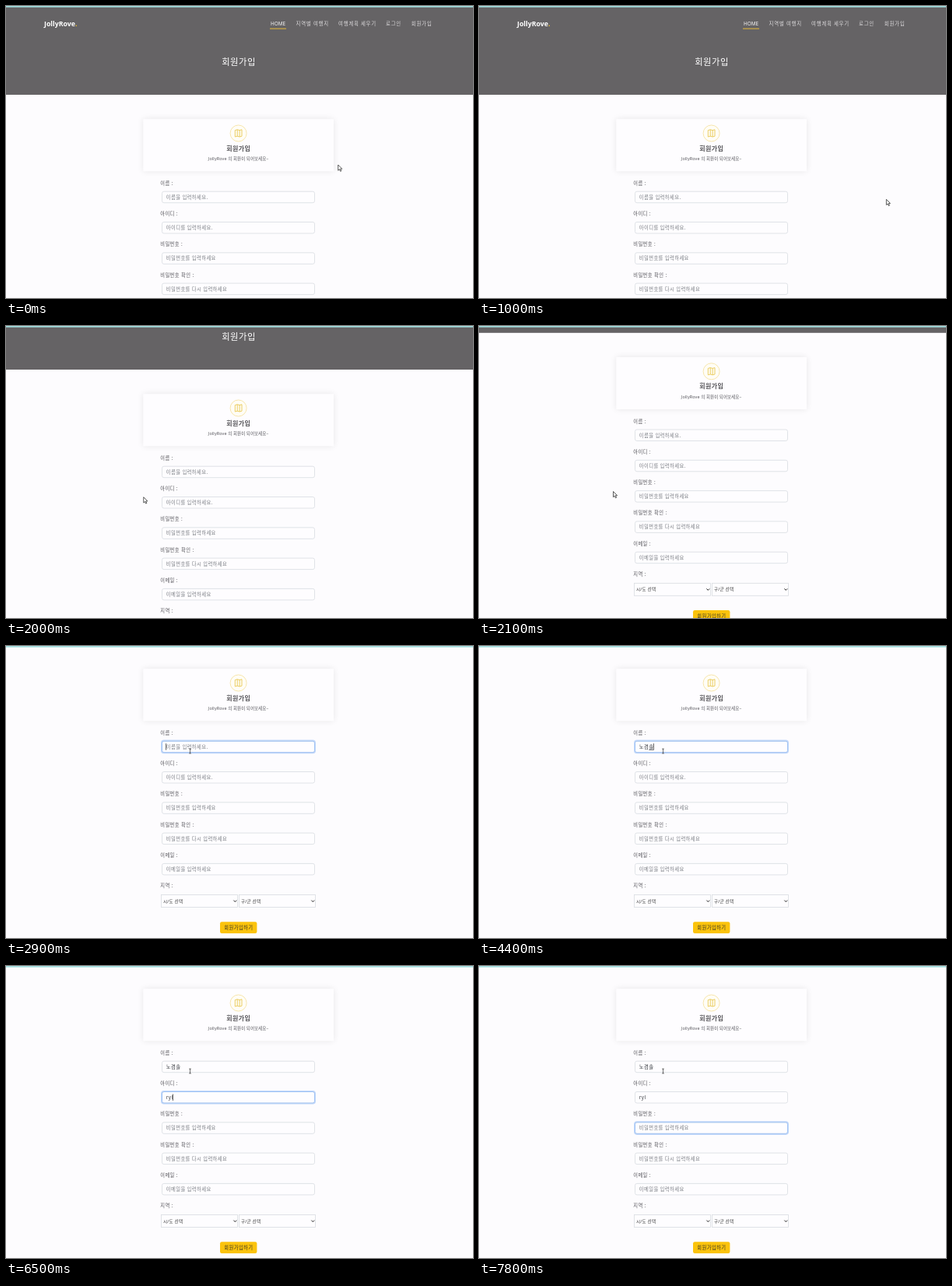
Write an HTML page that moves like this. It is 600x375 px and loops after 8 s.

```html
<!DOCTYPE html>
<html lang="ko">
<head>
<meta charset="utf-8">
<title>회원가입</title>
<style>
  html, body { margin: 0; width: 100%; height: 100%; overflow: hidden; background: #fdfcfe; }
  svg { display: block; width: 100vw; height: 100vh; }
  text { font-family: "Noto Sans", "Noto Sans CJK KR", "Noto Sans CJK", sans-serif; white-space: pre; }
  .nav { font-size: 6.4px; letter-spacing: .75px; fill: #dedcde; }
  .home { font: 500 6.4px "Open Sans", "Noto Sans", sans-serif; fill: #fff; }
  .brand { font: 700 8.8px "Noto Sans", sans-serif; fill: #fff; }
  .mid { text-anchor: middle; }
  .title { font-size: 11.3px; letter-spacing: .5px; fill: #fff; }
  .head { font-size: 8px; font-weight: 600; letter-spacing: .4px; fill: #565559; }
  .sub { font-size: 5.4px; letter-spacing: .15px; fill: #55545a; }
  .form { font-size: 6.3px; letter-spacing: .4px; }
  .label { fill: #55545a; }
  .hint { fill: #7b7e84; }
  .typed { fill: #3a3d42; }
  .go { fill: #3a3626; }
  .pick { font-size: 5.5px; letter-spacing: .25px; fill: #333; }
  .box { fill: #fefdff; stroke: #d9dce1; stroke-width: .8; }
</style>
</head>
<body>
<svg id="stage" viewBox="0 0 600 375" preserveAspectRatio="none">
  <defs>
    <filter id="soft" x="-10%" y="-30%" width="120%" height="160%"><feGaussianBlur stdDeviation="4"/></filter>
  </defs>
  <rect width="600" height="375" fill="#fdfcfe"/>
  <g id="page">
    <rect width="600" height="114" fill="#656365"/>
    <text class="brand" x="49" y="25.6">JollyRove<tspan fill="#f5c62c">.</tspan></text>
    <text class="home" x="340" y="24.9">HOME</text>
    <rect x="339" y="28.6" width="21" height="1" fill="#e6b93a"/>
    <g id="nav"></g>
    <text class="mid title" x="299" y="76.3">회원가입</text>

    <rect x="176.3" y="145.2" width="244.7" height="67" fill="#000" opacity=".085" filter="url(#soft)"/>
    <rect x="176.3" y="145.2" width="244.7" height="67" fill="#fefdff"/>
    <circle cx="298.6" cy="163.5" r="10.5" fill="#fffdf6" stroke="#f6e4a4" stroke-width=".9"/>
    <path d="M294.3 159.6l2.9-.8 2.9.8 2.9-.8v8.4l-2.9.8-2.9-.8-2.9.8zM297.2 158.8v8.4M300.1 159.6v8.4"
      fill="none" stroke="#e9c954" stroke-width=".9" stroke-linejoin="round"/>
    <text class="mid head" x="298.7" y="185.5">회원가입</text>
    <text class="mid sub" x="298.7" y="198.2">JollyRove 의 회원이 되어보세요~</text>

    <g id="form"></g>
    <rect x="275" y="470.2" width="47.4" height="14.8" rx="2.2" fill="#fbc30c"/>
    <text class="mid form go" x="298.9" y="480.2">회원가입하기</text>
    <rect id="line" height=".6" fill="#3a3d42"/>
    <rect id="caret" width=".8" height="8.4" fill="#333"/>
  </g>
  <rect width="600" height="1.7" fill="#a3dfe0"/>
  <path id="arrow" d="M0 0v7.2l1.7-1.5 1.2 2.6 1.2-.5-1.2-2.6h2.2z" fill="#fff" stroke="#333" stroke-width=".8" stroke-linejoin="round"/>
  <path id="beam" d="M-1.4-2.9h2.8M0-2.9v5.8M-1.4 2.9h2.8" fill="none" stroke="#444" stroke-width=".75"/>
</svg>
<script>
const LOOP = 8000, TICK = 100, ROW = 39.3, LEFT = 205.8;
const $ = id => document.getElementById(id);
const put = (el, attrs) => { for (const k in attrs) el.setAttribute(k, attrs[k]); };

const rows = [
  ['이름 :', '이름을 입력하세요.'],
  ['아이디 :', '아이디를 입력하세요.'],
  ['비밀번호 :', '비밀번호를 입력하세요'],
  ['비밀번호 확인 :', '비밀번호를 다시 입력하세요'],
  ['이메일 :', '이메일을 입력하세요']
];
const label = (s, i) => `<text class="form label" x="198.2" y="${229.8 + i * ROW}">${s}</text>`;
const field = ([name, hint], i) => {
  const y = 238.2 + i * ROW;
  return label(name, i) +
    `<rect class="ring" x="199.8" y="${y - .8}" width="197.4" height="16.1" rx="3" fill="none" stroke="#c3d9fb" stroke-width="1.6"/>
     <rect class="box" x="200.5" y="${y}" width="196" height="14.5" rx="2.4"/>
     <rect class="ring" x="200.5" y="${y}" width="196" height="14.5" rx="2.4" fill="none" stroke="#98bff6" stroke-width=".9"/>
     <text class="form hint" x="${LEFT}" y="${y + 9.6}">${hint}</text>
     <text class="form typed" x="${LEFT}" y="${y + 9.6}"></text>`;
};
const pick = (x, s) =>
  `<rect class="box" x="${x}" y="435.5" width="98.2" height="16"/>
   <text class="pick" x="${x + 2.6}" y="445.7">${s}</text>
   <path d="M${x + 93} 442.6l1.9 1.9 1.9-1.9" fill="none" stroke="#222" stroke-width="1"/>`;

$('nav').innerHTML = [[372.6, '지역별 여행지'], [427, '여행계획 세우기'], [488, '로그인'], [520.8, '회원가입']]
  .map(([x, s]) => `<text class="nav" x="${x}" y="25">${s}</text>`).join('');
$('form').innerHTML = rows.map((r, i) => `<g>${field(r, i)}</g>`).join('') +
  label('지역 :', 5) + pick(199.4, '시/도 선택') + pick(299.4, '구/군 선택');
const fields = [...$('form').querySelectorAll('g')].map(g => ({
  rings: g.querySelectorAll('.ring'),
  hint: g.querySelector('.hint'),
  typed: g.querySelector('.typed')
}));

// time, x, y of the pointer
const moves = [
  [0, 426.7, 204], [500, 556, 251], [600, 556, 251], [800, 548, 249], [900, 548, 249],
  [1600, 103, 236], [1900, 181, 227], [2100, 172.5, 212.5], [2300, 172.5, 212.5], [2700, 236.5, 135]
];
const scroll = [[0, 0], [1900, 0], [2000, 58], [2100, 105.2], [2200, 115], [2300, 116]];
const typing = [
  [[3500, 's'], [3600, 'sh'], [3900, ''], [4000, 'ㄴ'], [4100, '노'], [4200, '노겨'], [4300, '노겸ㅅ'], [4400, '노겸솔']],
  [[6100, 'r'], [6300, 'ry'], [6500, 'ryl']]
];
const focusAt = [2800, 4900, 7300];
const caretOn = [[2800, 3200], [3500, 4700], [4900, 5500], [6000, 7000], [7300, 7800]];
const composing = [4000, 4700];

const within = (t, [a, b]) => t >= a && t < b;
const clamp = v => Math.min(1, Math.max(0, v));

function along(keys, t) {
  const i = keys.findIndex(k => k[0] > t);
  if (i < 0) return keys[keys.length - 1].slice(1);
  const a = keys[i - 1], b = keys[i];
  const u = (t - a[0]) / (b[0] - a[0]), e = u * u * (3 - 2 * u);
  return a.slice(1).map((v, j) => v + (b[j + 1] - v) * e);
}

function textAt(steps, t) {
  let s = '';
  for (const [at, value] of steps || []) if (t >= at) s = value;
  return s;
}

function draw(t) {
  put($('page'), { transform: `translate(0 ${-along(scroll, t)[0]})` });

  const fade = i => i in focusAt ? clamp((t - focusAt[i] + 60) / 150) : 0;
  fields.forEach((f, i) => {
    const s = textAt(typing[i], t), glow = fade(i) * (1 - fade(i + 1));
    f.rings.forEach(r => put(r, { opacity: glow }));
    f.typed.textContent = s;
    put(f.hint, { opacity: s ? 0 : 1 });
  });

  const active = focusAt.filter(at => t >= at).length - 1;
  const row = Math.max(0, active), el = fields[row].typed;
  const end = LEFT + (el.textContent ? el.getComputedTextLength() : 0);
  const top = 241.2 + row * ROW;
  put($('caret'), { x: end - .5, y: top, opacity: +caretOn.some(span => within(t, span)) });
  put($('line'), { x: end - 6.1, y: top + 8, width: 5.8, opacity: +within(t, composing) });

  const [x, y] = along(moves, t), over = t >= 2700;
  put($('arrow'), { transform: `translate(${x} ${y})`, opacity: over ? 0 : 1 });
  put($('beam'), { transform: `translate(${x} ${y})`, opacity: over ? 1 : 0 });
}

function frame() {
  draw(Math.floor(performance.now() % LOOP / TICK) * TICK);
  requestAnimationFrame(frame);
}
frame();
</script>
</body>
</html>
```
